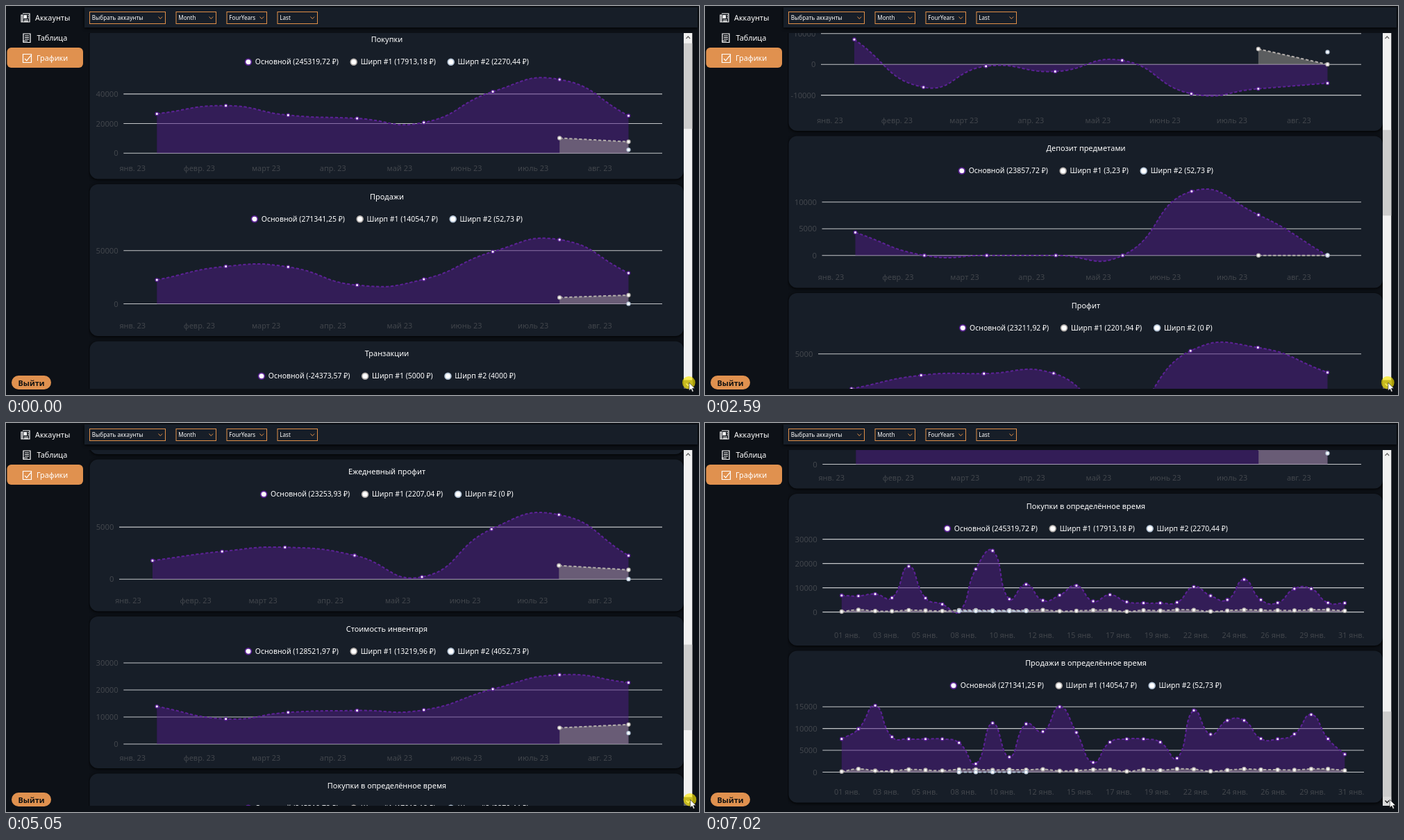
These frames come from a looping animation (998 by 561 pixels, 7220 ms). An HTML page:

```html
<!DOCTYPE html>
<html lang="ru">
<head>
<meta charset="utf-8">
<title>Графики</title>
<style>
html, body { margin: 0; width: 100%; height: 100%; overflow: hidden; background: #0d1117; }
svg { display: block; width: 100vw; height: 100vh; font-family: "Noto Sans", "Open Sans", sans-serif; }
.panel { fill: #171e28; filter: drop-shadow(0 1px 2px #000); }
.accent { fill: #e0914f; }
.icon { fill: none; stroke: #fff; stroke-width: 1.2; }
.grid { stroke: #c4c6c9; stroke-width: 1.1; }
</style>
</head>
<body>
<svg viewBox="0 0 998 561">
  <defs><clipPath id="view"><rect x="119" y="39" width="869" height="513"/></clipPath></defs>
  <rect width="998" height="561" fill="#0d1117"/>
  <rect class="panel" x="113" y="2" width="883" height="29"/>
  <g id="menu">
    <rect class="accent" x="1.5" y="60" width="109.5" height="29" rx="6"/>
    <rect class="accent" x="8" y="533" width="57" height="20" rx="10"/>
    <path class="icon" d="M24 11h10v12H22V13h2v10M26 20h6M26 22h6M31 14h2M31 17h2"/>
    <rect x="25.5" y="13" width="4.5" height="5" fill="#fff"/>
    <path class="icon" d="M25 40h10v12.500H25zM27 43h6M27 45.500h6M27 48h6M24 50.500h7"/>
    <path class="icon" d="M24.500 69.500h12v12h-12zM27 76l2.800 2.800 6-7.500"/>
  </g>
  <g clip-path="url(#view)"><g id="cards"></g></g>
  <rect x="976" y="39" width="12.300" height="513" fill="#f1f1f1"/>
  <path d="M979.500 47l2.800-3 2.800 3" fill="none" stroke="#606060" stroke-width="1.200"/>
  <rect id="thumb" x="976" width="12.300" height="123.500" fill="#cdcdcd"/>
  <rect id="down" x="976" y="539.500" width="12.300" height="12.500"/>
  <path id="chevron" d="M979.500 544.500l2.800 3 2.800-3" fill="none" stroke-width="1.200"/>
  <g id="pointer">
    <circle id="halo" r="9.300" fill="#ffeb00"/>
    <path d="M.5 0V11.500L3.200 9 5.100 13.200 6.900 12.400 5.100 8.300H8.700Z" fill="#fff" stroke="#111" stroke-width=".6"/>
  </g>
</svg>
<script>
const $ = id => document.getElementById(id);
const menu = $('menu'), cards = $('cards');

function add(parent, tag, attrs) {
  const node = document.createElementNS('http://www.w3.org/2000/svg', tag);
  for (const key in attrs) node.setAttribute(key, attrs[key]);
  parent.appendChild(node);
  return node;
}

// y is the middle of the capitals
function label(parent, text, x, y, size, extra) {
  const attrs = { x, y: y + size * 0.36, 'font-size': size, fill: '#fff' };
  const node = add(parent, 'text', Object.assign(attrs, extra));
  node.textContent = text;
  return node;
}

label(menu, 'Аккаунты', 42, 17.3, 10.8);
label(menu, 'Таблица', 44.5, 46.5, 10.8);
label(menu, 'Графики', 44, 75.5, 10.8);
label(menu, 'Выйти', 36.5, 543.7, 10.8, { 'text-anchor': 'middle', 'font-weight': 600, fill: '#111' });

function combo(text, x, width) {
  const pen = { fill: 'none', stroke: '#e08f48' };
  add(menu, 'rect', { x, y: 8.5, width, height: 17, ...pen });
  add(menu, 'path', { d: `M${x + width - 10} 15.5l2.8 3 2.8-3`, ...pen });
  label(menu, text, x + 3.3, 17, 8.1);
}
combo('Выбрать аккаунты', 120.5, 109);
combo('Month', 245, 57.5);
combo('FourYears', 318, 57.5);
combo('Last', 391, 57.5);

const ACCOUNTS = [
  { name: 'Основной', line: '#5c2296', fill: '#511d85', dot: 2.2 },
  { name: 'Ширп #1', line: '#b3aeab', fill: '#a09b96', dot: 2.5 },
  { name: 'Ширп #2', line: '#b4c4d6', fill: '#9fb0c4', dot: 2.5 }
];
const MIDDLE = 548.5, PITCH = 226.5, MUTED = '#42464c';
const YEAR = 2023, MONTHS = ['янв.', 'февр.', 'март', 'апр.', 'май', 'июнь', 'июль', 'авг.'];

// Smooth curve: tangents follow neighbouring midpoints, weighted by length
function spline(pts) {
  const mix = (a, b, k) => [a[0] + (b[0] - a[0]) * k, a[1] + (b[1] - a[1]) * k];
  const dist = (a, b) => Math.hypot(a[0] - b[0], a[1] - b[1]);
  const shift = (p, a, b) => [p[0] + a[0] - b[0], p[1] + a[1] - b[1]];
  let d = 'M' + pts[0];
  for (let i = 0; i < pts.length - 1; i++) {
    const p1 = pts[i], p2 = pts[i + 1], p0 = pts[i - 1] || p1, p3 = pts[i + 2] || p2;
    const l1 = dist(p0, p1), l2 = dist(p1, p2), l3 = dist(p2, p3);
    const c1 = mix(p0, p1, 0.5), c2 = mix(p1, p2, 0.5), c3 = mix(p2, p3, 0.5);
    const m1 = mix(c1, c2, l1 / (l1 + l2)), m2 = mix(c2, c3, l2 / (l2 + l3));
    d += `C${shift(p1, c2, m1)} ${shift(p2, c2, m2)} ${p2}`;
  }
  return d;
}

function series(g, pts, zero, { line, fill, dot }) {
  const curve = spline(pts);
  add(g, 'path', { d: `${curve}V${zero}H${pts[0][0]}Z`, fill, 'fill-opacity': 0.5 });
  add(g, 'path', { d: curve, fill: 'none', stroke: line, 'stroke-width': 2, 'stroke-dasharray': '4.2 2.8' });
  for (const [cx, cy] of pts) {
    add(g, 'circle', { cx, cy, r: dot, fill: '#fff', stroke: line, 'stroke-width': 1.3 });
  }
}

// One centred row of markers and names
function legend(g, totals) {
  const row = add(g, 'g', {});
  let x = 0;
  totals.forEach((total, i) => {
    const { name, line } = ACCOUNTS[i];
    add(row, 'circle', { cx: x + 4.8, cy: 32.2, r: 4.4, fill: '#fff', stroke: line, 'stroke-width': 1.7 });
    const text = `${name} (${String(total).replace('.', ',')} ₽)`;
    x += 14.7 + label(row, text, x + 14.7, 32.2, 10.45).getComputedTextLength() + 17;
  });
  row.setAttribute('transform', `translate(${MIDDLE - (x - 17) / 2} 0)`);
}

let count = 0;

// Heights are measured from the middle of the card title
function card(title, totals, { step, gap, zero, left, low = 0, high }, right) {
  const g = add(cards, 'g', { transform: `translate(0 ${48.5 + PITCH * count++})` });
  add(g, 'rect', { class: 'panel', x: 120.5, y: -18, width: 855.5, height: 219, rx: 12 });
  label(g, title, MIDDLE, 0, 10.9, { 'text-anchor': 'middle' });
  legend(g, totals);
  for (let i = low; i <= high; i++) {
    const y = zero - i * gap;
    add(g, 'line', { class: 'grid', x1: left, x2: right, y1: y, y2: y });
    label(g, i * step, left - 7.5, y, 11.3, { 'text-anchor': 'end', fill: MUTED });
  }
  return g;
}

function axis(g, texts, first, last) {
  texts.forEach((text, i) => {
    const x = first + (last - first) * i / (texts.length - 1);
    label(g, text, x, 186, 10.9, { 'text-anchor': 'middle', fill: MUTED });
  });
}

// The last month brings every account to its total
function monthly(title, totals, scale, main, second) {
  const g = card(title, totals, scale, 945);
  const start = scale.left + 48, end = 896.5, { zero, gap, step } = scale;
  const day = m => (Date.UTC(YEAR, m) - Date.UTC(YEAR, 0)) / 864e5;
  [main, second, []].forEach((known, i) => {
    const rest = known.reduce((sum, v) => sum - v, totals[i] / 1000);
    const values = [...known, rest], skip = MONTHS.length - values.length;
    const pts = values.map((v, j) => [
      start + (end - start) * day(j + skip) / day(MONTHS.length - 1),
      zero - v * 1000 / step * gap
    ]);
    series(g, pts, zero, ACCOUNTS[i]);
  });
  axis(g, MONTHS.map(m => m + ' 23'), scale.left + 13, 855.3);
}

function random(seed) {
  return () => (seed = seed * 16807 % 2147483647) / 2147483647;
}

// A steady level with a few narrow rises and falls: [day, thousands]
function daily(title, totals, scale, level, bumps) {
  const g = card(title, totals, scale, 949);
  const { zero, gap, step } = scale, rand = random(7);
  const plot = (i, from, n, value) => {
    const pts = Array.from({ length: n }, (_, j) => [
      196.8 + (from + j) * 24.15, zero - value(from + j) * 1000 / step * gap
    ]);
    series(g, pts, zero, ACCOUNTS[i]);
  };
  plot(0, 0, 31, d => bumps.reduce((sum, [at, rise]) => sum + rise * Math.exp(-2 * (d - at) ** 2), level));
  plot(1, 0, 31, () => totals[1] / 31000 * (0.3 + 1.4 * rand()));
  plot(2, 7, 5, () => totals[2] / 5000);
  const dates = Array.from({ length: 14 }, (_, i) => Math.floor(1.2 + i * 2.32));
  axis(g, dates.map(n => String(n).padStart(2, '0') + ' янв.'), 204.8, 930.8);
}

monthly('Покупки', [245319.72, 17913.18, 2270.44],
  { step: 20000, gap: 42.65, zero: 163.7, left: 169.3, high: 2 },
  [26.6, 32.1, 25.7, 23.5, 20.7, 41.6, 49.8], [10.2]);
monthly('Продажи', [271341.25, 14054.7, 52.73],
  { step: 50000, gap: 76.7, zero: 154.5, left: 169.3, high: 1 },
  [22.5, 35.2, 34.7, 17.6, 23.1, 49, 60.3], [5.9]);
monthly('Транзакции', [-24373.57, 5000, 4000],
  { step: 10000, gap: 44.45, zero: 105.2, left: 167, low: -1, high: 1 },
  [8.1, -7.4, -0.6, -2.3, 1.3, -9.5, -7.9], [5]);
monthly('Депозит предметами', [23857.72, 3.23, 52.73],
  { step: 5000, gap: 38.5, zero: 154.2, left: 168.5, high: 2 },
  [4.3, 0, 0, 0, 0, 12, 7.6], [0]);
monthly('Профит', [23211.92, 2201.94, 0],
  { step: 5000, gap: 70.2, zero: 140, left: 163, high: 1 },
  [1.42, 2.81, 2.98, 3.01, -1.09, 5.32, 5.66], [1]);
monthly('Ежедневный профит', [23253.93, 2207.04, 0],
  { step: 5000, gap: 75.1, zero: 154.7, left: 163, high: 1 },
  [1.78, 2.66, 3.06, 2.28, 0.21, 4.81, 6.19], [1.31]);
monthly('Стоимость инвентаря', [128521.97, 13219.96, 4052.73],
  { step: 10000, gap: 39, zero: 166, left: 169.3, high: 3 },
  [13.9, 9.3, 11.7, 12.4, 12.6, 20.3, 25.6], [6]);
daily('Покупки в определённое время', [245319.72, 17913.18, 2270.44],
  { step: 10000, gap: 35, zero: 152.6, left: 169.3, high: 3 }, 3.7,
  [[0, 3.1], [1.6, 5.1], [4, 15.1], [7, -3.7], [8.6, 29.7], [11, 7.7],
    [13.7, 8.6], [16, 3.4], [21.3, 8], [24, 9.7], [27.5, 9.7]]);
daily('Продажи в определённое время', [271341.25, 14054.7, 52.73],
  { step: 5000, gap: 31.43, zero: 157, left: 169.3, high: 3 }, 7.6,
  [[1.8, 8.3], [8, -6.4], [9, 5.2], [10, -5.1], [11.2, 4.5], [13.2, 8],
    [15, -5.4], [20, -5.4], [21, 7.3], [23.5, 7], [27.9, 5.7], [30, -3.5]]);

const LOOP = 7220, START = 550, TICK = 68, RELEASE = 6950;
// Scroll speed drifts a little: [tick, distance]
const PATH = [[0, 0], [22, 374], [39, 654.5], [55, 923], [67, 1110.5], [84, 1403], [90.7, 1514]];

function scrollAt(tick) {
  const i = PATH.findIndex(([k], j) => j && tick <= k);
  if (i < 0) return PATH[PATH.length - 1][1];
  const [k0, y0] = PATH[i - 1], [k1, y1] = PATH[i];
  return y0 + (y1 - y0) * (tick - k0) / (k1 - k0);
}

function draw(t) {
  const y = scrollAt(Math.max(0, Math.floor((t - START) / TICK) + 1));
  const held = t < RELEASE;
  cards.setAttribute('transform', `translate(0 ${-y})`);
  $('thumb').setAttribute('y', 53.7 + y * 0.2394);
  $('down').setAttribute('fill', held ? '#606060' : '#dadada');
  $('chevron').setAttribute('stroke', held ? '#fff' : '#111');
  const x = t < 3900 ? 983.3 : t < 6130 ? 984.9 : 985.7;
  $('pointer').setAttribute('transform', `translate(${x} 543.2)`);
  $('halo').setAttribute('opacity', held ? 0.65 : t < RELEASE + 70 ? 0.3 : 0);
}

const begin = performance.now();
function loop() {
  draw((performance.now() - begin) % LOOP);
  requestAnimationFrame(loop);
}
loop();
</script>
</body>
</html>
```
